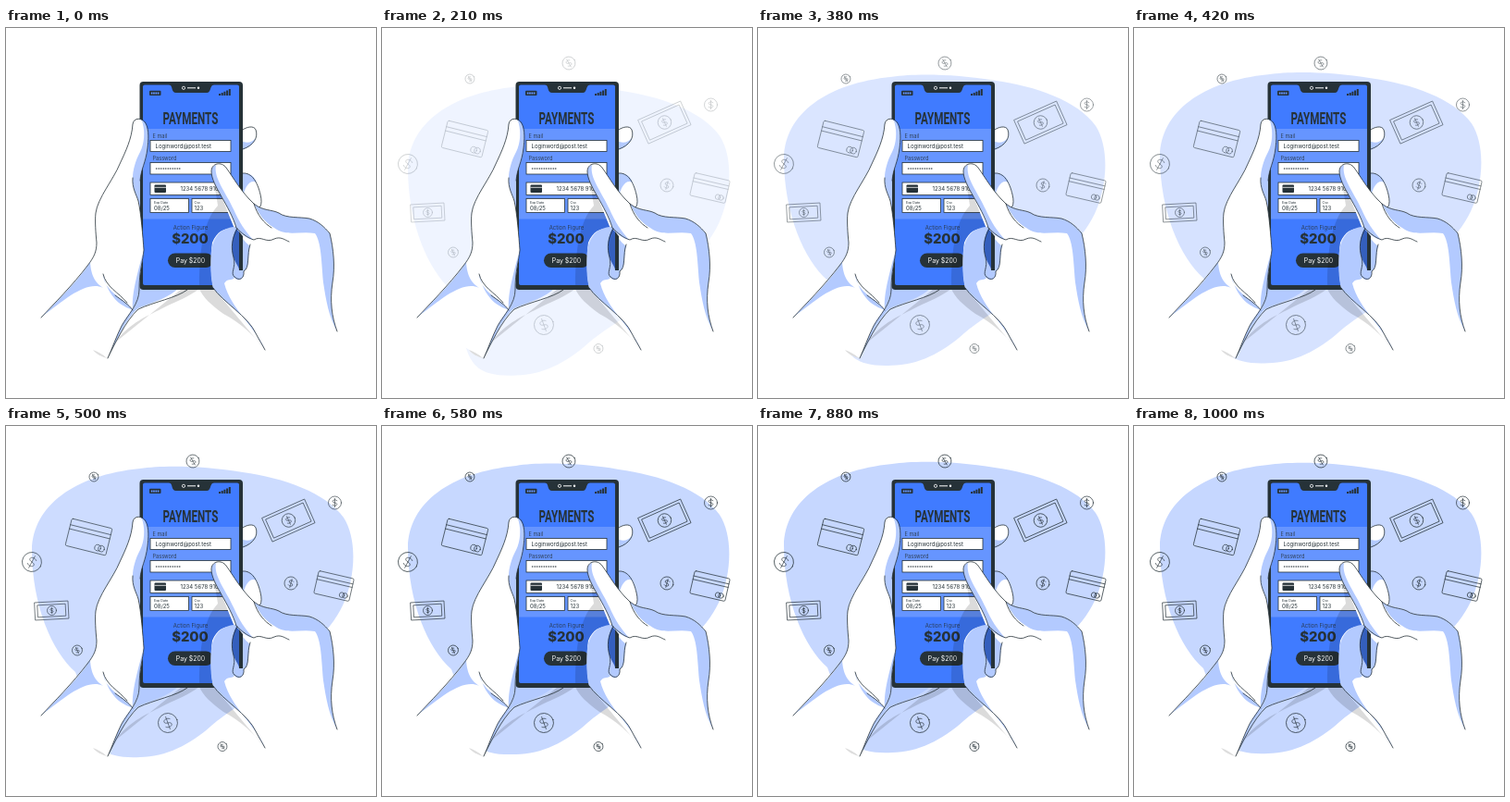
Animation of 400x400 px, one loop 1.04 s. Source, as an HTML page:

```html
<!DOCTYPE html>
<html lang="en">
<head>
<meta charset="utf-8">
<title>Payments</title>
<style>
html, body { margin: 0; width: 100%; height: 100%; overflow: hidden; background: #fff; }
svg { display: block; width: 100vw; height: 100vh; }
text { font-family: Inter, Roboto, sans-serif; fill: #263238; }
.line { fill: none; stroke: #263238; stroke-width: .8; stroke-linecap: round; stroke-linejoin: round; }
.thin { stroke-width: .7; }
.white { fill: #fff; }
.tint { fill: #b3caff; }
.dark { fill: #263238; }
.shade { fill: #000; opacity: .14; }
.field { fill: #fff; stroke: #263238; stroke-width: .8; }
.mid { text-anchor: middle; }
</style>
</head>
<body>
<svg viewBox="0 0 400 400">
  <path id="blob" fill="#c6d7ff" d="M145 42C170 38 215 39 256 46C300 52 346 68 365 95C380 118 378 160 364 190C350 220 318 245 290 270C262 293 238 306 222 320C200 340 172 354 145 354C125 355 112 352 104 346C85 330 90 300 75 262C50 240 28 190 28 130C29 82 74 49 145 42Z"/>
  <g id="icons" class="line thin"></g>

  <!-- shadows under the hands -->
  <path class="shade" d="M190 282L118 340C134 318 152 312 173 301C186 295 196 291 209 282C212 290 222 300 235 309C255 320 266 330 280 348L224 281Z"/>

  <!-- fingers behind the phone -->
  <path class="white" d="M252 111C258 108 267 104 270 110C273 118 268 127 252 132Z"/>
  <path class="tint" d="M254 122C260 125 266 124 270 119C267 126 262 130 254 132Z"/>
  <path class="line" d="M256 110C260 107 268 105 270 110C273 118 268 127 256 131"/>
  <path class="white" d="M252 158C266 155 271 165 275 180C278 192 274 197 268 196C262 195 258 190 252 186Z"/>
  <path class="tint" d="M254 157C266 156 269 162 271 167C264 163 258 171 256 184Z"/>
  <path class="line" d="M256 157C266 156 272 167 275 180C278 192 274 197 268 196C262 194 259 190 256 185"/>
  <path class="tint" d="M140 270H197C184 290 160 296 143 303C128 316 119 340 110 356L100 348Z"/>
  <path class="line" d="M196 283C184 292 160 296 143 304C128 318 118 342 110 356"/>

  <!-- phone -->
  <rect class="dark" x="144.500" y="58" width="111.500" height="225" rx="4"/>
  <rect x="148" y="61.500" width="104" height="216.500" rx="2" fill="#407bff"/>
  <path fill="#6695ff" d="M148 109H252V206.500H148Z"/>
  <path class="dark" d="M176 61C181 62 178 70 184 70H217C222 70 220 62 225 61Z"/>
  <g fill="none" stroke="#fff"><circle cx="192" cy="64.800" r="1.600" stroke-width=".8"/><path d="M196 64.800H205"/></g>
  <circle class="white" cx="208" cy="64.800" r="1.200"/>
  <rect class="dark" x="155" y="67.800" width="12.500" height="5.200" rx="1"/>
  <path stroke="#6695ff" stroke-width="2" stroke-dasharray="1.700 .6" d="M156.800 70.400H166"/>
  <path class="dark" d="M230 73v-2h2v2zM232.700 73v-3h2v3zM235.400 73v-4.300h2v4.300zM238.100 73v-5.600h2v5.600zM240.800 73v-7h2v7z"/>
  <text class="mid" transform="translate(199.500 104) scale(.63 1)" font-size="18.500" font-weight="700" style="font-family:Roboto,sans-serif">PAYMENTS</text>
  <g font-size="5.600" opacity=".85">
    <text x="158.500" y="119.200">E mail</text>
    <text x="158.500" y="143.200">Password</text>
  </g>
  <g class="field">
    <rect x="156" y="121.500" width="87" height="12"/>
    <rect x="156" y="145.500" width="87" height="12.500"/>
    <rect x="156" y="167" width="87" height="13.500"/>
    <rect x="156" y="184.500" width="41.500" height="15"/>
    <rect x="201" y="184.500" width="42" height="15"/>
  </g>
  <g font-size="6">
    <text x="161.500" y="129.500">Loginword@post.test</text>
    <text x="161.500" y="154.700" font-size="5">***********</text>
    <text x="188.500" y="176">1234 5678 910</text>
    <text x="160" y="196.500">08/25</text>
    <text x="203.500" y="196.500">123</text>
    <text x="160" y="189.800" font-size="3.600">Exp Date</text>
    <text x="203.500" y="189.800" font-size="3.600">Cvc</text>
    <text class="mid" x="199.500" y="218" opacity=".85">Action Figure</text>
  </g>
  <rect class="dark" x="160.500" y="169.500" width="12.500" height="8.500" rx="1"/>
  <path d="M160.500 172.300h12.500" stroke="#fff" stroke-width=".8"/>
  <text class="mid" x="199" y="233" font-size="14.800" font-weight="800">$200</text>
  <rect class="dark" x="175" y="243.500" width="49" height="15.500" rx="7.700"/>
  <text class="mid" x="199.500" y="253.800" font-size="6.900" style="fill:#fff">Pay $200</text>
  <path class="shade" d="M223 153C225 170 228 184 229 192C215 207 209 235 209 278H226L252 262V216L240 190Z"/>

  <!-- left hand -->
  <path class="tint" d="M143 98C154 100 155 114 153 130C151 146 146 152 145 165V194L134 170L140 140Z"/>
  <path class="white" d="M38 313C52 298 72 278 88 257C95 248 98 242 98 232C97 222 96 208 97 200C99 184 116 164 123 147C129 134 136 120 137 104C138 96 147 96 148 104C150 112 150 124 145 134C140 143 137 154 137 162C136 173 141 180 143 187C146 200 148 226 149 240C148 252 144 262 144 283C144 298 132 310 125 322C119 334 115 346 110 357L96 349Z"/>
  <path class="tint" d="M149 240C148 252 144 266 144 284C143 299 131 310 124 322L137 304C136 291 139 275 149 240Z"/>
  <path class="tint" d="M38 313C54 296 76 276 91 253C92 270 98 276 105 281C88 273 66 291 38 313Z"/>
  <path class="tint" d="M105 266C106 282 120 289 132 299L137 305C131 302 112 298 105 266Z"/>
  <path d="M94 348C99 350 104 352 109 357C103 355 98 353 94 348Z" fill="#ddd"/>
  <path class="line" d="M38 313C52 298 72 278 88 257C95 248 98 242 98 232C97 222 96 208 97 200C99 184 116 164 123 147C129 134 136 120 137 104C138 96 148 97 151 103C155 110 154 122 153 130C151 146 146 152 145 165M137 162C136 173 141 180 143 187C146 200 148 226 149 240C148 252 144 262 144 283C144 298 132 310 125 322C119 334 115 346 110 357M105 266C108 280 122 286 131 297M118 289C126 295 133 299 137 305"/>

  <!-- right hand -->
  <path class="white" d="M222 155C222 146 233 144 238 151C246 162 254 177 268 190C278 198 287 196 295 200C303 206 318 204 328 206C338 209 344 215 350 222C354 238 356 258 353 275C350 295 352 312 358 328L280 348C275 322 243 304 224 281C221 265 221 245 223 232C229 218 238 216 247 217Z"/>
  <path class="tint" d="M222 155C222 151 224 149 227 148C224 162 238 178 246 196C252 210 259 220 267 229C259 227 253 222 249 216C242 192 222 170 222 155Z"/>
  <path class="tint" d="M268 190C278 198 287 196 295 200C303 206 318 204 328 206C338 209 344 215 350 222C354 238 356 258 353 275C350 295 352 312 358 328C349 312 346 295 343 275C341 254 341 231 334 222C318 219 302 226 290 216C280 210 274 203 268 190Z"/>
  <path class="tint" d="M249 215C236 215 225 222 222 240C221 257 221 270 224 281C234 296 262 312 270 330C274 338 277 342 280 348C272 326 243 304 236 276C240 270 243 274 247 270C252 275 258 271 257 263C264 260 261 244 264 236C258 231 252 224 249 215Z"/>
  <path fill="#345fbd" d="M249 217C244 227 243 238 246 248C249 256 252 258 252 262V220Z"/>
  <path class="dark" d="M252 220L256 225V262H252Z"/>
  <path class="line" d="M249 216C242 192 222 170 222 155C222 146 233 144 238 151C246 162 254 177 268 190C278 198 287 196 295 200C303 206 318 204 328 206C338 209 344 215 350 222C354 238 356 258 353 275C350 295 352 312 358 328M249 216C255 222 261 227 268 229C276 224 281 233 290 228C297 225 301 229 306 231M268 190C272 203 279 211 287 216M250 217C244 227 243 238 246 248C249 259 242 265 247 269C252 274 258 271 257 263C264 259 260 245 264 234M224 281C234 296 262 312 270 330C274 338 277 342 280 348"/>
</svg>
<script>
const icons = document.getElementById("icons"), blob = document.getElementById("blob");

const place = (x, y, angle, body) => `<g transform="translate(${x} ${y}) rotate(${angle})">${body}</g>`;
const rect = (w, h, r = 0) => `<rect x="${-w / 2}" y="${-h / 2}" width="${w}" height="${h}" rx="${r}"/>`;
const disc = (r, x = 0, y = 0) => `<circle cx="${x}" cy="${y}" r="${r}"/>`;
const dollar = s => `<path transform="scale(${s})" vector-effect="non-scaling-stroke" d="M3-3C1-5-3-4-3-2C-3 1 3-1 3 2C3 4-1 5-3 3M0-6V6"/>`;
const coin = (x, y, r, angle) => place(x, y, angle, disc(r) + dollar(r / 9));
const card = (x, y, w, h, angle) => place(x, y, angle, rect(w, h, 1.5) +
  `<path d="M${-w / 2} ${-h * .27}h${w}M${-w / 2} ${-h * .12}h${w}"/>` +
  disc(h * .11, w * .27, h * .3) + disc(h * .11, w * .36, h * .3));
const note = (x, y, w, h, angle) => place(x, y, angle,
  rect(w, h) + rect(w - 6, h - 6) + disc(h * .26) + dollar(h * .028));

icons.innerHTML = [
  [202, 38, 7, -30], [95, 55, 5, -30], [355.5, 83, 7, 0], [28, 147, 10.5, 28],
  [308, 170, 7, 15], [77, 242.5, 5.5, -25], [175, 321, 10.5, -20], [234, 346.5, 5, -35]
].map(c => coin(...c)).join("") +
  card(89.5, 120, 45, 30, 14) + card(354.5, 173, 39, 25, 13) +
  note(305.5, 102, 50, 28, -24) + note(49.5, 199.5, 36, 19, -3);

const cubic = (a, b, s) => 3 * s * (1 - s) ** 2 * a + 3 * s * s * (1 - s) * b + s ** 3;

// Ease with a small overshoot; bisection finds the curve parameter.
function ease(x) {
  let lo = 0, hi = 1;
  for (let i = 0; i < 24; i++) {
    const s = (lo + hi) / 2;
    if (cubic(.36, .5, s) < x) lo = s; else hi = s;
  }
  return cubic(-.01, 1.38, lo);
}

const LOOP = 1040, HIDDEN = 130, LEAD = 68, RISE = 30;

function draw() {
  const t = performance.now() % LOOP;
  const p = t < HIDDEN ? 0 : ease(Math.min(1, (t + LEAD) / 1000));
  const alpha = Math.max(0, Math.min(1, p));
  blob.setAttribute("transform", `translate(0 ${RISE * (1 - p)})`);
  blob.setAttribute("opacity", alpha);
  icons.setAttribute("opacity", alpha);
  requestAnimationFrame(draw);
}
draw();
</script>
</body>
</html>
```
